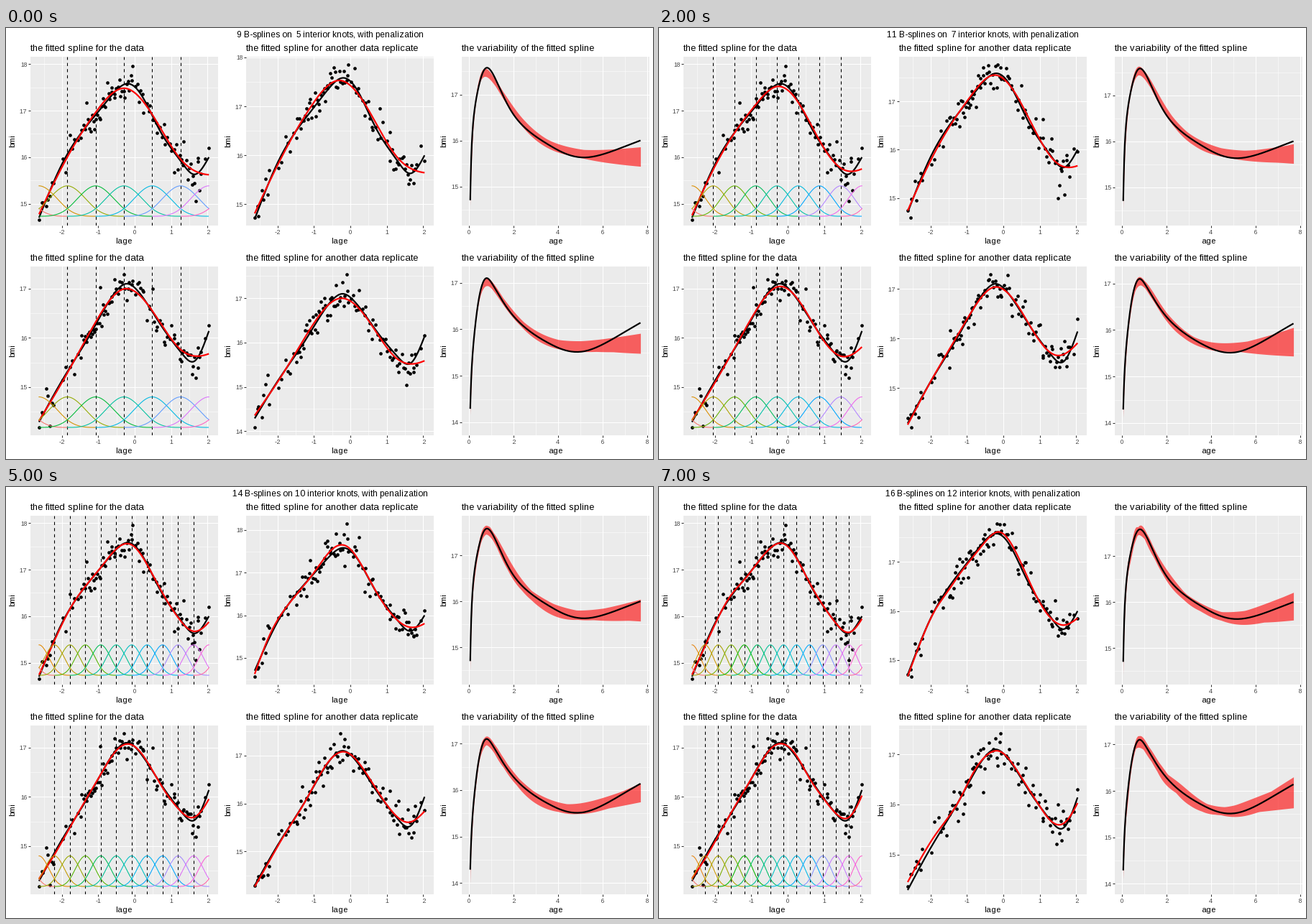
A matplotlib script that plays this animation: 900x600 px, repeating every 8000 ms.

```python
import numpy as np
import matplotlib.pyplot as plt
from matplotlib.animation import FuncAnimation
from matplotlib.ticker import MultipleLocator

W, H, DPI = 900, 600, 100
PX = 72 / DPI  # points per pixel
plt.rcParams.update({
    "font.family": "Liberation Sans",
    "axes.unicode_minus": False,
    "text.hinting_factor": 1,  # whole-pixel letter spacing
})

FIRST_KNOTS, STEPS = 5, 8
LO, HI = -2.63, 2.04  # range of log age
GRID = np.linspace(LO, HI, 300)
NOISE, PENALTY, REPLICATES = .18, .3, 100

LEFT, TOP = (34, 334, 634), (40, 332)
PANEL_W, PANEL_H = 260.7, 235
TITLES = ("the fitted spline for the data",
          "the fitted spline for another data replicate",
          "the variability of the fitted spline")

# Median bmi of the two groups at a few log ages
NODES = [LO, -2, -1.2, -.8, -.45, -.22, .1, .7, 1.3, 1.65, HI]
MEDIAN = ([14.70, 15.85, 16.79, 17.17, 17.48, 17.58, 17.43, 16.56, 15.88, 15.63, 16.00],
          [14.29, 15.13, 16.10, 16.63, 17.00, 17.10, 16.94, 16.28, 15.68, 15.53, 16.14])

# Points that stand out from the cloud
OUTLIERS = ([(-1.84, 16.42), (-1.31, 17.2), (-.77, 17.57), (-.04, 17.98), (.81, 16.74),
             (1.12, 15.68), (1.38, 16.31), (1.69, 15.05), (1.79, 15.29), (2.03, 16.2)],
            [(-2.45, 15.01), (-2.35, 14.2), (-.95, 17.04), (-.32, 17.31), (.33, 16.39),
             (.45, 17.06), (.85, 15.83), (.98, 16.28), (1.69, 15.19), (2.03, 16.23)])

DATA_VIEW = ((14.53, 18.16), (14.02, 17.45))
BAND_VIEW = ((14.15, 17.82), (13.72, 17.35))
BASIS_FOOT, BASIS_HEIGHT = (14.73, 14.18), (.98, .93)


def spline(xs, ys, x):
    """Natural cubic spline through (xs, ys), evaluated at x."""
    xs, ys = np.asarray(xs, float), np.asarray(ys, float)
    h, n = np.diff(xs), len(xs)
    a, b = np.eye(n), np.zeros(n)
    slope = np.diff(ys) / h
    for i in range(1, n - 1):
        a[i, i - 1:i + 2] = h[i - 1], 2 * (h[i - 1] + h[i]), h[i]
        b[i] = 6 * (slope[i] - slope[i - 1])
    m = np.linalg.solve(a, b)
    i = np.clip(np.searchsorted(xs, x) - 1, 0, n - 2)
    p, q = xs[i + 1] - x, x - xs[i]
    return ((m[i] * p**3 + m[i + 1] * q**3) / (6 * h[i])
            + (ys[i] / h[i] - m[i] * h[i] / 6) * p
            + (ys[i + 1] / h[i] - m[i + 1] * h[i] / 6) * q)


def median(row, x):
    return spline(NODES, MEDIAN[row], x)


def basis(x, n):
    """The n uniform cubic B-splines over the age range, one per column."""
    h = (HI - LO) / (n - 3)
    centres = LO + h * (np.arange(n) - 1)
    t = np.abs(x[:, None] - centres) / h
    return np.where(t < 1, 2 / 3 - t**2 + t**3 / 2, np.clip(2 - t, 0, None) ** 3 / 6)


def smoother(n, out):
    """Matrix that maps data at AGES to the penalized fit at out."""
    b = basis(AGES, n)
    d = np.diff(np.eye(n), 2, axis=0)
    return basis(out, n) @ np.linalg.solve(b.T @ b + PENALTY * d.T @ d, b.T)


def make_ages():
    # rank of a point against its log age: sparse at first, crowded near the end
    ranks = [0, 7, 8, 14, 52, 73, 83, 92, 94]
    marks = [LO, -2.2, -1.98, -1.48, -.04, 1.06, 1.5, 1.83, HI]
    x = np.interp(np.arange(95), ranks, marks)
    x[1:-1] += np.random.default_rng(3).normal(0, .012, 93)
    return np.sort(np.clip(x, LO, HI))


def make_data(row):
    """Noise without a smooth trend around the median, plus the outliers."""
    resid = np.random.default_rng(11 + row).normal(0, NOISE * .85, len(AGES))
    for x, y in OUTLIERS[row]:
        resid[np.abs(AGES - x).argmin()] = y - median(row, x)
    resid -= smoother(12, AGES) @ resid
    return median(row, AGES) + resid


def hue(i, n):
    """Evenly spaced hue at luminance 65 and chroma 100."""
    a = np.radians(15 + 360 * i / n)
    u = 100 * np.cos(a) / (13 * 65) + .1978
    v = 100 * np.sin(a) / (13 * 65) + .4683
    y = (81 / 116) ** 3
    x = 9 * y * u / (4 * v)
    z = -x / 3 - 5 * y + 3 * y / v
    rgb = np.array([[3.2406, -1.5372, -.4986],
                    [-.9689, 1.8758, .0415],
                    [.0557, -.2040, 1.0570]]) @ [x, y, z]
    rgb = np.clip(rgb, 0, 1)
    return tuple(np.where(rgb > .0031, 1.055 * rgb ** (1 / 2.4) - .055, 12.92 * rgb))


AGES = make_ages()
DATA = [make_data(0), make_data(1)]
fig = plt.figure(figsize=(W / DPI, H / DPI), dpi=DPI, facecolor="white")


def label(x, y, text, size, **kw):
    return fig.text(x / W, 1 - y / H, text, fontsize=size * PX, color="black", **kw)


def make_panel(row, col):
    x, y = LEFT[col], TOP[row]
    label(x, y - 8, TITLES[col], 13)
    label(x + 130, y + 260, "age" if col == 2 else "lage", 11, ha="center")
    label(x - 24.5, y + 117.5, "bmi", 11, ha="center", va="center", rotation=90)
    return fig.add_axes([x / W, 1 - (y + PANEL_H) / H, PANEL_W / W, PANEL_H / H])


panels = [[make_panel(r, c) for c in range(3)] for r in range(2)]
heading = label(451, 13, "", 12, ha="center")


def reset(ax, view, xlim=(-2.866, 2.286), step=1):
    """Empty the panel and set its scales, grid and ticks."""
    ax.cla()
    ax.set_facecolor("#EBEBEB")
    for s in ax.spines.values():
        s.set_visible(False)
    for axis, unit in ((ax.xaxis, step), (ax.yaxis, 1)):
        axis.set_major_locator(MultipleLocator(unit))
        axis.set_minor_locator(MultipleLocator(unit / 2))
    ax.set_axisbelow(True)
    ax.grid(True, which="major", color="white", lw=1.07 * PX)
    ax.grid(True, which="minor", color="white", lw=.53 * PX)
    ax.tick_params(which="major", length=2.75 * PX, width=1.07 * PX, color="#333333",
                   labelcolor="#4D4D4D", labelsize=9 * PX, pad=2.2 * PX)
    ax.tick_params(which="minor", length=0)
    ax.set_xlim(xlim)
    ax.set_ylim(view)


def curve(ax, x, y, color):
    ax.plot(x, y, color=color, lw=2.2 * PX, solid_capstyle="butt", zorder=5)


def dots(ax, y):
    ax.plot(AGES, y, "o", color="black", ms=4.7 * PX, mew=0, zorder=4)


def draw_data(ax, row, n, fit):
    reset(ax, DATA_VIEW[row])
    dots(ax, DATA[row])
    for x in np.linspace(LO, HI, n - 2)[1:-1]:
        ax.axvline(x, color="black", lw=1.07 * PX, ls=(0, (4, 4)), zorder=3)
    curve(ax, GRID, median(row, GRID), "black")
    curve(ax, GRID, fit, "red")
    for k, b in enumerate(basis(GRID, n).T):
        on = b > 0
        ax.plot(GRID[on], BASIS_FOOT[row] + BASIS_HEIGHT[row] * b[on],
                color=hue(k, n), lw=1.07 * PX, zorder=6)


def draw_replicate(ax, row, y, fit):
    low, high = min(y.min(), fit.min()), max(y.max(), fit.max())
    pad = .05 * (high - low)
    reset(ax, (low - pad, high + pad))
    dots(ax, y)
    curve(ax, GRID, median(row, GRID), "black")
    curve(ax, GRID, fit, "red")


def draw_band(ax, row, i, fits):
    drift = .008 * i
    low, high = BAND_VIEW[row]
    reset(ax, (low + drift, high + drift), xlim=(-.306, 8.08), step=2)
    age = np.exp(GRID)
    ax.fill_between(age, fits.min(axis=1), fits.max(axis=1),
                    color="red", alpha=.6, lw=0, zorder=3)
    curve(ax, age, median(row, GRID), "black")


def draw(i):
    knots = FIRST_KNOTS + i
    n = knots + 4
    heading.set_text(f"{n} B-splines on {knots:2d} interior knots, with penalization")
    smooth = smoother(n, GRID)
    for row, (left, middle, right) in enumerate(panels):
        rng = np.random.default_rng(100 * row + i)
        noise = rng.normal(0, NOISE, (len(AGES), REPLICATES))
        samples = median(row, AGES)[:, None] + noise
        fits = smooth @ samples
        draw_data(left, row, n, smooth @ DATA[row])
        draw_replicate(middle, row, samples[:, 0], fits[:, 0])
        draw_band(right, row, i, fits)
    return []


anim = FuncAnimation(fig, draw, frames=STEPS, interval=1000, repeat=True, blit=False)
plt.show()
```
